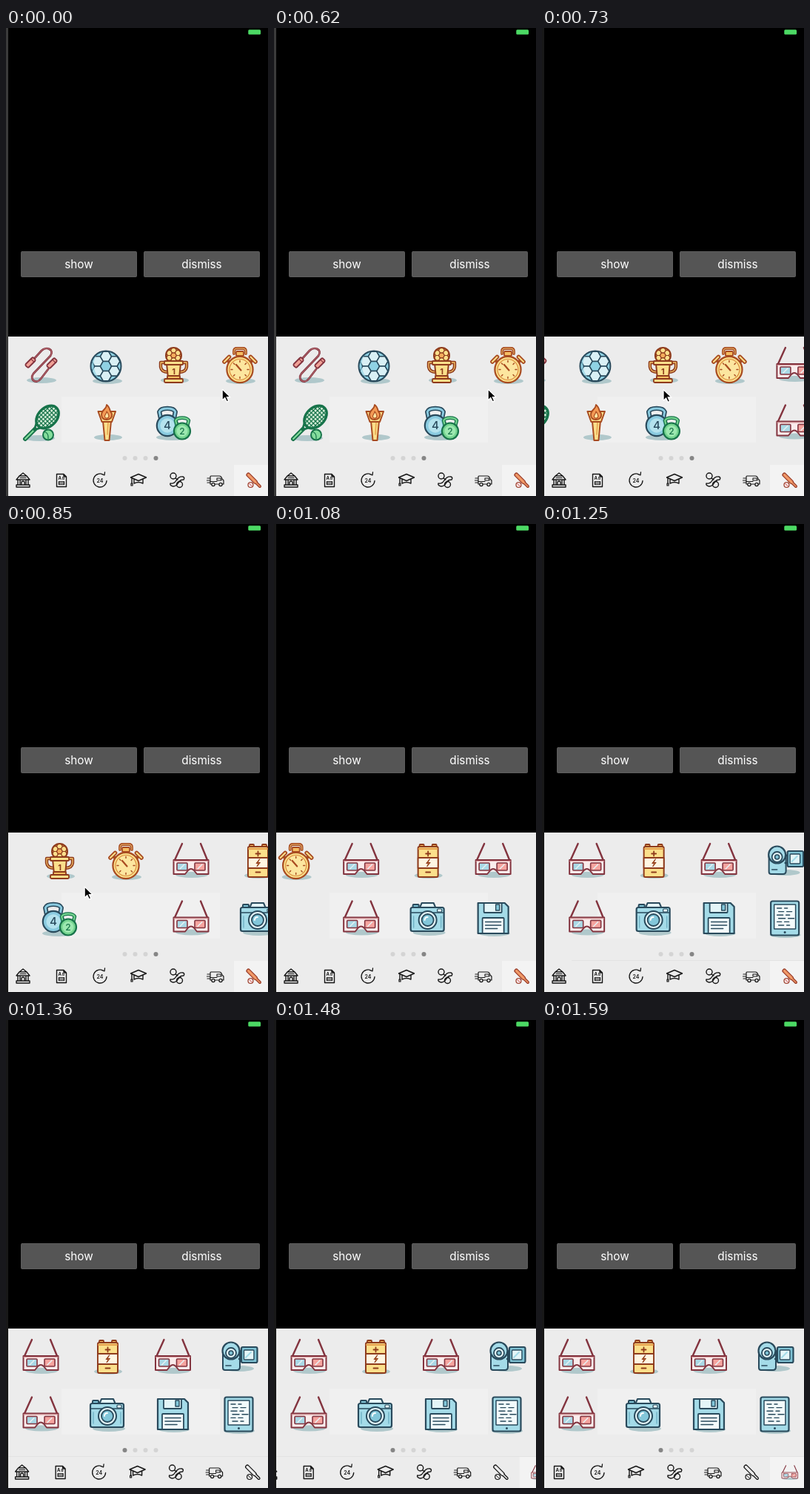
Write an HTML page with a canvas that moves like this. It is 354 px wide and 631 px high and loops after 2750 ms.

```html
<!DOCTYPE html>
<html lang="en">
<head>
<meta charset="utf-8">
<title>Sticker keyboard</title>
<style>
html, body { margin: 0; width: 100%; height: 100%; overflow: hidden; background: #000; }
canvas { display: block; width: 354px; height: 631px; }
</style>
</head>
<body>
<canvas width="354" height="631"></canvas>
<script>
const ctx = document.querySelector('canvas').getContext('2d');
const LOOP = 2750, PAGE = 357, TAB = 52;
const TICKS = [0, 620, 680, 730, 790, 850, 960, 1020, 1080, 1130,
  1190, 1250, 1300, 1360, 1420, 1470, 1530, 1590];
const NAVY = '#294a5c', BLUE = '#a4dbe8', PALE = '#e4f5f8', WINE = '#83343f',
  RUST = '#a84b20', GOLD = '#fbdf8b', BROWN = '#8e3b1c', GREEN = '#17734a', MINT = '#84dd9c';
ctx.lineJoin = ctx.lineCap = 'round';

function paint(path, fill, stroke, width = 2) {
  if (fill) { ctx.fillStyle = fill; ctx.fill(path); }
  if (stroke) { ctx.strokeStyle = stroke; ctx.lineWidth = width; ctx.stroke(path); }
}
const draw = (d, ...style) => paint(new Path2D(d), ...style);
// Line with a coloured core, like a bent tube
function tube(d, edge, core, outer, inner) {
  draw(d, null, edge, outer);
  draw(d, null, core, inner);
}
function box(x, y, w, h, r, ...style) {
  const p = new Path2D();
  p.roundRect(x, y, w, h, r);
  paint(p, ...style);
}
function oval(x, y, rx, ry, turn, ...style) {
  const p = new Path2D();
  p.ellipse(x, y, rx, ry, turn, 0, 7);
  paint(p, ...style);
}
const disc = (x, y, r, ...style) => oval(x, y, r, r, 0, ...style);
const shadow = (x, y, w = 20) => oval(x, y, w, 4, 0, '#b0c8cb');
function text(s, x, y, font, color) {
  ctx.font = font + ' Inter, "Liberation Sans", sans-serif';
  ctx.textAlign = 'center';
  ctx.textBaseline = 'alphabetic';
  ctx.fillStyle = color;
  ctx.fillText(s, x, y);
}
function at(x, y, fn) {
  ctx.save();
  ctx.translate(x, y);
  fn();
  ctx.restore();
}
function clipTo(build, fn) {
  ctx.save();
  ctx.beginPath();
  build();
  ctx.clip();
  fn();
  ctx.restore();
}

// Ball covered by a three-coloured hexagon lattice
function ball(x, y, r, size, dark, light, line, width) {
  at(x, y, () => {
    clipTo(() => ctx.arc(0, 0, r, 0, 7), () => {
      for (let q = -3; q <= 3; q++) for (let k = -4; k <= 4; k++) {
        const p = new Path2D(), cx = 1.5 * size * q, cy = Math.sqrt(3) * size * (k + q / 2);
        for (let i = 0; i < 6; i++)
          p.lineTo(cx + size * Math.cos(i * Math.PI / 3), cy + size * Math.sin(i * Math.PI / 3));
        p.closePath();
        paint(p, (q - k) % 3 ? light : dark, line, width);
      }
    });
    disc(0, 0, r, null, line, 2);
  });
}

function rope() {
  shadow(48, 475);
  tube('M38 446L48 435C54 429 66 433 60 442L37 466C31 474 41 481 47 473L57 460', WINE, '#cf8388', 2.8, 0.8);
  for (const [x, y] of [[33, 451], [62, 452]]) at(x, y, () => {
    ctx.rotate(-0.78);
    box(-7.5, -3, 15, 6, 2, '#f0a196', WINE, 1.8);
    draw('M4 -3V3', null, WINE, 1.2);
  });
}
function football() {
  shadow(137, 476);
  ball(135, 456, 20.5, 7.6, '#8fd2e4', '#d9f0f5', NAVY, 1.5);
  draw('M122 441A20 20 0 0 0 128 474A26 26 0 0 1 122 441Z', '#8fd2e4aa');
}
function trophy() {
  shadow(228, 475, 19);
  tube('M218 451H209V457Q210 464 219 464M235 451H244V457Q243 464 234 464', BROWN, '#f6c56c', 4.4, 1.3);
  ball(226.5, 441.5, 10.5, 4, '#f4ad5c', GOLD, BROWN, 1.2);
  draw('M217 452H236L234 472H219Z', GOLD, BROWN);
  box(214, 449, 25, 5, 1, GOLD, BROWN, 1.8);
  box(218, 469, 17, 4, 1, '#f6bd62', BROWN, 1.8);
  box(214, 473, 25, 5, 1.5, GOLD, BROWN, 1.8);
  text('1', 226.5, 467, 'bold 11px', BROWN);
}
function stopwatch() {
  shadow(317, 476);
  tube('M308 439V436Q308 432 312 432H320Q324 432 324 436V439', RUST, GOLD, 3.8, 0.8);
  box(311, 436, 10, 6, 1, '#f6bd62', RUST, 1.8);
  draw('M303 452L299 448M329 452L333 448', null, RUST, 4);
  tube('M295 450L301.5 443.5M337 450L330.5 443.5', RUST, GOLD, 5.6, 2);
  disc(316, 460.5, 17.6, GOLD, RUST, 2.2);
  disc(316, 460.5, 14, '#fce69f', '#d98b3d', 1.2);
  for (let i = 0; i < 8; i++) at(316, 460.5, () => {
    ctx.rotate(i * Math.PI / 4);
    draw('M0 -12V-10', null, RUST, 1.4);
  });
  draw('M311 454L317.5 461.5', null, RUST, 2.2);
}
function racket() {
  shadow(45, 553, 21);
  tube('M26 554L39 541', GREEN, MINT, 6, 2);
  draw('M38 542L42 530M38 542L50 538', null, GREEN, 2.6);
  at(56, 524.5, () => {
    ctx.rotate(-Math.PI / 4);
    oval(0, 0, 17.5, 12.5, 0, '#d3ecd7');
    clipTo(() => ctx.ellipse(0, 0, 17.5, 12.5, 0, 0, 7), () => {
      for (let i = -16; i <= 16; i += 4)
        draw(`M${i} -14V14M-19 ${i}H19`, null, GREEN, 1.2);
    });
    oval(0, 0, 17.5, 12.5, 0, null, GREEN, 3.4);
  });
  disc(57, 548.5, 7, MINT, GREEN);
  draw('M52 544.5Q58 546 57 554', null, GREEN, 1.2);
}
function torch() {
  shadow(138, 552, 19);
  draw('M131 530H142L139.5 556H133.5Z', GOLD, RUST);
  draw('M138 532L137 548', null, '#e5a04d', 1.4);
  draw('M124.5 517H148L143 531H129.5Z', GOLD, RUST);
  draw('M136 508C136 514 129 515 129 521C129 526 132 528 136 528C141 528 144 525 143 520L141 517C140 513 139 510 136 508Z', '#f39a55', RUST, 1.8);
  draw('M136 517C136 521 133 521 133.5 524C134 527 139 527 139 523Q138 519 136 517Z', '#fce6a3', RUST, 1.1);
}
function kettlebell(x, y, r, fill, inner, line, digit) {
  const h = r * 0.62;
  const d = `M${x - h} ${y - r * .6}L${x - h - 2} ${y - r * 1.3}Q${x - h} ${y - r * 1.62} ${x} ${y - r * 1.62}` +
    `T${x + h + 2} ${y - r * 1.3}L${x + h} ${y - r * .6}`;
  tube(d, line, fill, r * .44, r * .2);
  disc(x, y, r, fill, line, 2.2);
  disc(x, y, r * .68, inner);
  text(digit, x, y + r * .38, `500 ${r + 1}px`, line);
}
function weights() {
  shadow(225, 552, 22);
  kettlebell(218, 536, 14.2, '#8acbe0', '#b4e2ed', NAVY, '4');
  kettlebell(238, 543.5, 11, '#74d48f', '#9ce8b0', GREEN, '2');
}

function glasses() {
  shadow(48, 473, 22);
  draw('M25 453L35 431M69 453L60 431', null, WINE, 2.4);
  draw('M23.5 453H70.5V472H55L51 467Q47 463 43 467L39 472H23.5Z', '#faecec', WINE);
  draw('M24 454.5H70', null, '#d99a9c', 1.2);
  box(28, 457, 14, 10, 1, '#a9d9e6', WINE, 1.6);
  box(52, 457, 14, 10, 1, '#f5a49f', WINE, 1.6);
  draw('M32 465L38 459M56 465L62 459', null, '#e7f0f2', 1.6);
}
function battery() {
  shadow(138, 474, 19);
  box(126, 432, 6, 5, 1, '#f3b65c', BROWN, 1.8);
  box(143, 432, 6, 5, 1, '#f3b65c', BROWN, 1.8);
  box(124, 435, 27, 41, 2, GOLD, BROWN);
  box(124, 450, 27, 14, 0, '#fff6e2', BROWN, 1.8);
  draw('M125 438H150', null, '#e5a04d', 2);
  draw('M134.5 444.5H140.5M137.5 441.5V447.5M134.5 469.5H140.5', null, BROWN, 1.8);
  draw('M139.5 452L135 457.5H138L136 462L140.5 456.5H137.5Z', '#e58a3c', BROWN, 1);
}
function camcorder() {
  shadow(314, 470, 21);
  draw('M293 448V469Q293 472 296 472H312Q316 472 316 468V446Z', BLUE, NAVY);
  draw('M315 447H319M315 457H319', null, NAVY, 2.4);
  box(318, 441, 21.5, 21, 2, '#7fc2d4', NAVY, 2.2);
  box(321.5, 445, 13.5, 13, 1, PALE, NAVY, 1.4);
  draw('M324 455L331 448', null, BLUE, 2);
  disc(304, 446, 11.5, BLUE, NAVY, 2.2);
  disc(304, 449, 7, PALE, NAVY, 1.8);
  disc(304, 449, 3, '#7fc2d4', NAVY, 1.6);
  draw('M297 466H304', null, NAVY, 1.6);
}
function camera() {
  shadow(139, 551, 22);
  box(117, 513, 8, 5, 1, '#7fc2d4', NAVY);
  draw('M126 518L129 511H145L148 518Z', PALE, NAVY);
  box(114, 517, 45, 32, 2.5, BLUE, NAVY, 2.2);
  draw('M115 524H158', null, NAVY, 1.6);
  box(150, 519, 6, 4, 1, PALE, NAVY, 1.2);
  disc(137, 534, 12, PALE, NAVY);
  disc(137, 534, 8, '#83c7da', NAVY, 1.8);
  draw('M133 534Q133 530 137 530', null, '#fff', 1.8);
  draw('M118 529V544M155 529V544', null, '#6fb2c5', 1.4);
}
function floppy() {
  shadow(227, 552, 21);
  draw('M205 511H241L246 516V552H205Z', BLUE, NAVY, 2.2);
  box(213, 511, 24, 13, 1, PALE, NAVY, 1.8);
  box(229, 513, 5, 8, 0, '#83c7da', NAVY, 1.4);
  box(211, 531, 29, 21, 1, '#f4fbfc', NAVY, 1.8);
  draw('M215 536.5H236M215 541H236M215 545.5H231', null, NAVY, 1.6);
}
function tablet() {
  shadow(315, 554, 21);
  box(295.5, 508.5, 38, 46, 2.5, '#a4dbe8', NAVY, 2.2);
  box(300, 513, 29, 33, 0.5, '#f2fafb', NAVY, 1.5);
  for (let i = 0; i < 6; i++)
    draw(`M${304 + i % 2 * 2} ${518 + i * 4.6}h${6 + i * 5 % 4}m4 0h${4 + i * 3 % 5}`, null, NAVY, 1.4);
  disc(314.5, 550.5, 1.5, NAVY);
}

const INK = '#161616';
const line = (d, w = 1.4) => draw(d, null, INK, w);
function bank() {
  line('M-5 -6L0 -10L5 -6ZM-5 -6L-9 -1H9L5 -6M-7 -1V6M-4 -1V6M4 -1V6M7 -1V6M-9 6H9V9H-9ZM-2 6V2Q0 0 2 2V6');
  line('M-4 -3.5H4', 1.2);
}
function page() {
  line('M-6.5 -8.5H3L6.5 -5V8.5H-6.5ZM3 -8.5V-5H6.5');
  text('A', -2.3, -0.6, 'bold 6px', INK);
  text('b', 2.6, -1, 'bold 5px', INK);
  line('M-3.5 1.5H3.5V5.5H-3.5ZM-3 3.5H3', 1.2);
}
function clock() {
  line('M5 -7.5A9 9 0 1 0 9 0.5M2 -8.5L6 -7.2L6.5 -11', 1.3);
  text('24', 0, 2.7, '600 7px', INK);
}
function cap() {
  line('M-10.5 -4L0 -8.5L10.5 -4L0 0.5ZM-6 -2V4Q0 1 6 4V-2M-9 -3V4');
  line('M-10 4H-8V7H-10Z', 1.2);
}
function pacifier() {
  disc(-5, -6, 4, null, INK, 1.4);
  line('M-9 4Q-4 5 -1 0Q3 -6 8 -5Q11 -4 9 -1Q4 -1 2 3Q-1 8 -5 8Q-10 7 -9 4ZM-2 -3L1 -1');
  disc(3.5, 5.5, 4, null, INK, 1.4);
}
function van() {
  line('M-7 5V-5Q-7 -6 -6 -6H5Q8 -6 9 -2L11 0V5H-7M-11 -3H-8M-11.5 0H-8M-11 3H-8', 1.2);
  line('M2 -3H7L8 0H2ZM-7 1.5H2', 1.1);
  disc(-3, 5.5, 2.1, '#ececec', INK, 1.3);
  disc(7, 5.5, 2.1, '#ececec', INK, 1.3);
}
function bat(on) {
  const edge = on ? '#9a3d2a' : INK, wood = on ? '#f19a68' : '#ececec';
  draw('M-7.5 -7.5L2 2', null, edge, 6);
  tube('M0 0L8 8', edge, wood, 4, 1.6);
  draw('M-7.5 -7.5L2 2', null, wood, 3.4);
  disc(-4.5, 6, 3.5, on ? '#f3e4e2' : '#ececec', edge, 1.2);
  draw('M-6.5 4L-2.5 8', null, on ? '#d45252' : INK, 1);
}
function shades() {
  at(0, 0, () => {
    ctx.scale(0.45, 0.42);
    ctx.translate(-47, -453);
    glasses();
  });
}

const place = (dx, dy, fn) => () => at(dx, dy, fn);
const sports = [rope, football, trophy, stopwatch, racket, torch, weights];
const gadgets = [glasses, battery, place(178.5, 0, glasses), camcorder,
  place(0, 77.5, glasses), camera, floppy, tablet];
const tabs = [bank, page, clock, cap, pacifier, van, bat, shades];

const clamp = v => Math.max(0, Math.min(1, v));
// Drag up to the release, then slow down onto the next page
function pageShift(t) {
  return t < 850 ? 154 * clamp((t - 620) / 230) ** 1.21
    : PAGE - 203 * (1 - clamp((t - 850) / 510)) ** 1.76;
}
function tabShift(t) {
  const u = clamp((t - 1335) / 255);
  return TAB * u * u * (3 - 2 * u);
}

function pointer(t) {
  if (t >= 1020) return;
  const u = clamp((t - 620) / 230);
  const x = t < 620 ? 293 : 290 - 183 * (1 - (1 - u) ** 1.77);
  at(x - 0.5, 487.5 + 2 * u * u, () => {
    draw('M0 0V14L3.2 11L5.8 16.5L8.2 15.4L5.8 10.2H10.2Z', '#fff', '#fff', 1.6);
    draw('M0.3 1V13L3.4 10L6.1 15.6L7.4 15L4.9 9.4H9Z', '#000');
  });
}

function button(x, label) {
  box(x + 0.5, 301.5, 156, 34, 1, '#555', '#5e5e5e', 1);
  text(label, x + 78.5, 324, '15.3px', '#fff');
}

function render(t) {
  const done = t >= 1335, shift = pageShift(t), slide = tabShift(t);
  box(0, 0, 354, 631, 0, '#000');
  box(0, 0, 3, 631, 0, t < 700 ? '#3b3b3b' : '#181818');
  box(327.3, 2.3, 16.8, 6.5, 1.5, '#4cd964');
  button(20, 'show');
  button(186, 'dismiss');
  box(3, 416, 351, 215, 0, '#ececec');
  box(75, 497, 214, 62, 0, '#f0f0f0');

  clipTo(() => ctx.rect(3, 416, 351, 215), () => {
    at(-shift, 0, () => sports.forEach(f => f()));
    at(PAGE - shift, 0, () => gadgets.forEach(f => f()));
    for (let i = 0; i < 4; i++)
      disc(160.5 + i * 14, 580, 3, i === (done ? 0 : 3) ? '#858585' : '#d4d4d4');
    if (t >= 1130) box(done ? 3 : 40, 588, 351, 1, 0, '#e3e3e3');
    const active = done ? 7 : 6;
    box(308 + (active - 6) * TAB - slide, 589, TAB, 42, 0, '#f3f3f3');
    tabs.forEach((f, i) => at(23 + i * TAB - slide, 610, () => f(i === active)));
  });
  pointer(t);
}

const start = performance.now();
function loop() {
  const t = Math.max(0, performance.now() - start) % LOOP;
  render(TICKS.findLast(k => k <= t));
  requestAnimationFrame(loop);
}
loop();
</script>
</body>
</html>
```
